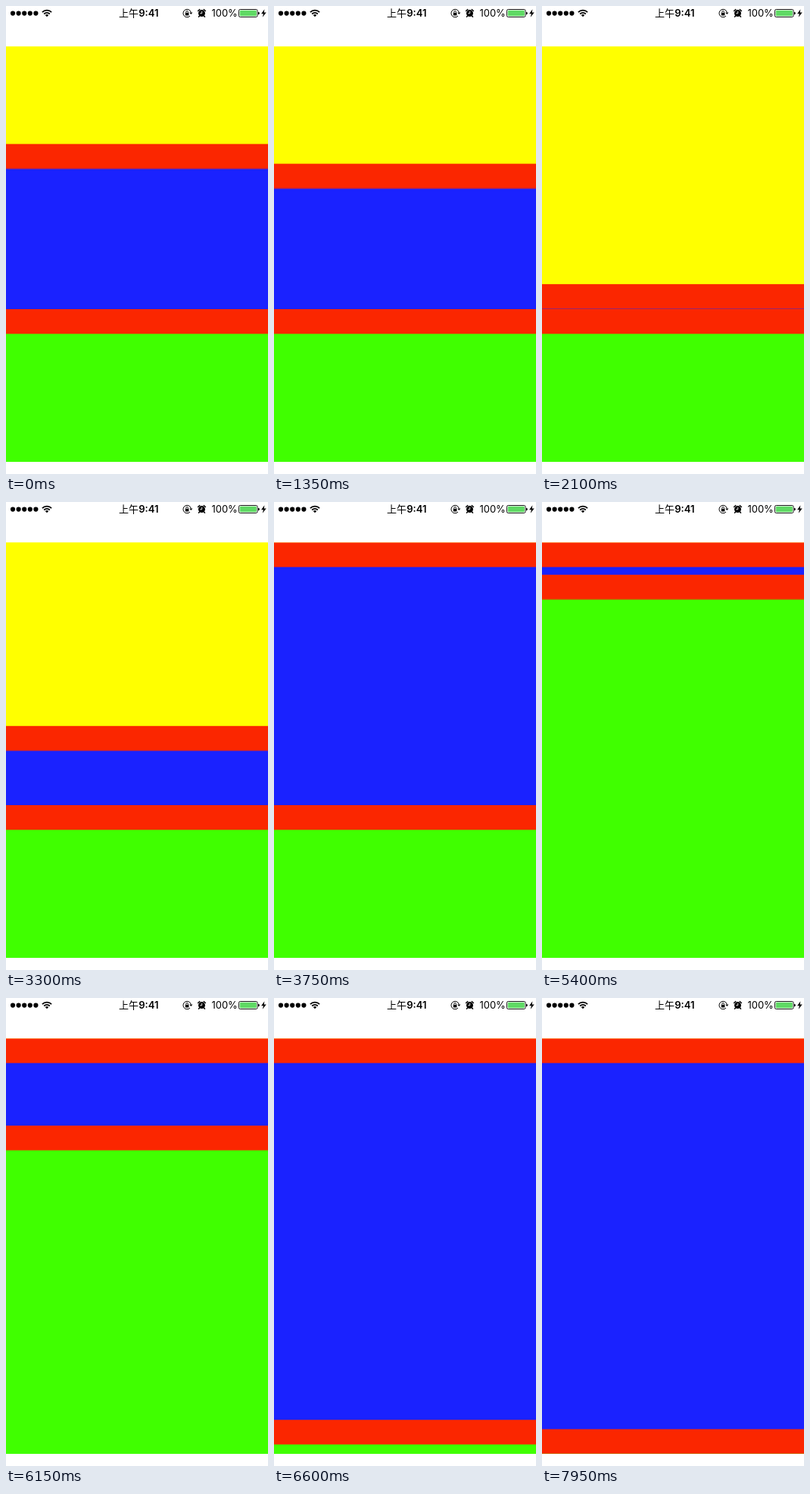
Animation of 346 by 616 pixels, one loop 8000 ms. Source, as an HTML page:

```html
<!DOCTYPE html>
<html lang="zh">
<head>
<meta charset="utf-8">
<title>Draggable dividers</title>
<style>
  html, body { margin: 0; width: 100%; height: 100%; overflow: hidden; background: #fff; }
  svg { display: block; width: 346px; height: 616px; }
  text { font-family: Inter, "Noto Sans CJK SC", "Noto Sans CJK", sans-serif; font-size: 13px; }
  .cjk { font-family: "Noto Sans CJK SC", "Noto Sans CJK", sans-serif; font-weight: 500; }
  .clock { font-weight: 600; }
  .bar { fill: #fb2600; }
  .yellow { fill: #ff0; }
  .blue { fill: #1a22ff; }
  .green { fill: #40ff00; }
  .line { fill: none; stroke: #000; }

  /* Each divider carries the panel above it; drags advance in 150 ms steps. */
  .upper { animation: upper 8s step-end infinite; }
  .lower { animation: lower 8s step-end infinite; }

  @keyframes upper {
    0%      { transform: translateY(181.6px); }
    16.875% { transform: translateY(207.6px); }
    18.75%  { transform: translateY(262.2px); }
    20.625% { transform: translateY(301.7px); }
    22.5%   { transform: translateY(344.2px); }
    24.375% { transform: translateY(363.7px); }
    26.25%  { transform: translateY(366.1px); }
    41.25%  { transform: translateY(294.8px); }
    43.125% { transform: translateY(209.8px); }
    45%     { transform: translateY(73.7px); }
    46.875%, 100% { transform: translateY(53.2px); }
  }
  @keyframes lower {
    0%      { transform: translateY(399px); }
    63.75%  { transform: translateY(357px); }
    65.625% { transform: translateY(216.3px); }
    67.5%   { transform: translateY(95.7px); }
    69.375% { transform: translateY(85.7px); }
    76.875% { transform: translateY(167.9px); }
    78.75%  { transform: translateY(256.9px); }
    80.625% { transform: translateY(416.2px); }
    82.5%   { transform: translateY(555.2px); }
    97.5%   { transform: translateY(567.1px); }
    99.375%, 100% { transform: translateY(567.5px); }
  }
</style>
</head>
<body>
<svg viewBox="0 0 346 616">
  <rect class="green" y="53" width="346" height="547"/>
  <g class="lower">
    <rect class="blue" y="-600" width="346" height="601"/>
    <rect class="bar" width="346" height="32.5"/>
  </g>
  <g class="upper">
    <rect class="yellow" y="-600" width="346" height="601"/>
    <rect class="bar" width="346" height="32.5"/>
  </g>
  <rect width="346" height="53.2" fill="#fff"/>
  <rect y="600" width="346" height="16" fill="#fff"/>

  <!-- signal -->
  <path class="line" d="M9 9.6h30.8" stroke-width="6.2" stroke-linecap="round" stroke-dasharray="0 7.6"/>
  <!-- wifi -->
  <g class="line" stroke-width="1.8">
    <path d="M47.9 8.1a8.7 8.7 0 0 1 12.2 0"/>
    <path d="M50.2 10.5a5.4 5.4 0 0 1 7.6 0"/>
  </g>
  <path d="M54 14.3l-2.2-2.3a3.1 3.1 0 0 1 4.4 0z"/>

  <text class="cjk" x="149" y="14.2">上午</text>
  <text class="clock" x="175.2" y="14.2">9:41</text>

  <!-- rotation lock -->
  <path class="line" d="M244.2 8.2a5.2 5.2 0 1 0-1.2 4.9" stroke-width="1"/>
  <path d="M242.2 8.4h4.2l-2.1 2.7z"/>
  <rect x="236.8" y="8.9" width="4.6" height="3.7" rx=".4"/>
  <path class="line" d="M237.8 9V7.8a1.3 1.3 0 0 1 2.6 0V9" stroke-width=".9"/>

  <!-- alarm -->
  <circle cx="258.5" cy="9.6" r="4.5"/>
  <path class="line" d="M253.6 6.6l2.2-2M263.4 6.6l-2.2-2M255.5 13l-1 1.2M261.5 13l1 1.2" stroke-width="1.4" stroke-linecap="round"/>
  <path d="M258.7 6.8v3h-2.5" fill="none" stroke="#fff" stroke-width=".9"/>

  <text x="271.4" y="14.2">100%</text>

  <!-- battery -->
  <rect class="line" x="307.5" y="4.5" width="24.6" height="10" rx="1.8" stroke-width=".9"/>
  <rect x="308.8" y="5.8" width="22" height="7.4" rx=".7" fill="#5fd964"/>
  <path d="M333 7.8a1.8 1.8 0 0 1 0 3.6z"/>
  <path d="M341.4 4.2l-4.3 6h2.8l-1.2 4.5 5-6.3h-3z"/>
</svg>
</body>
</html>
```
